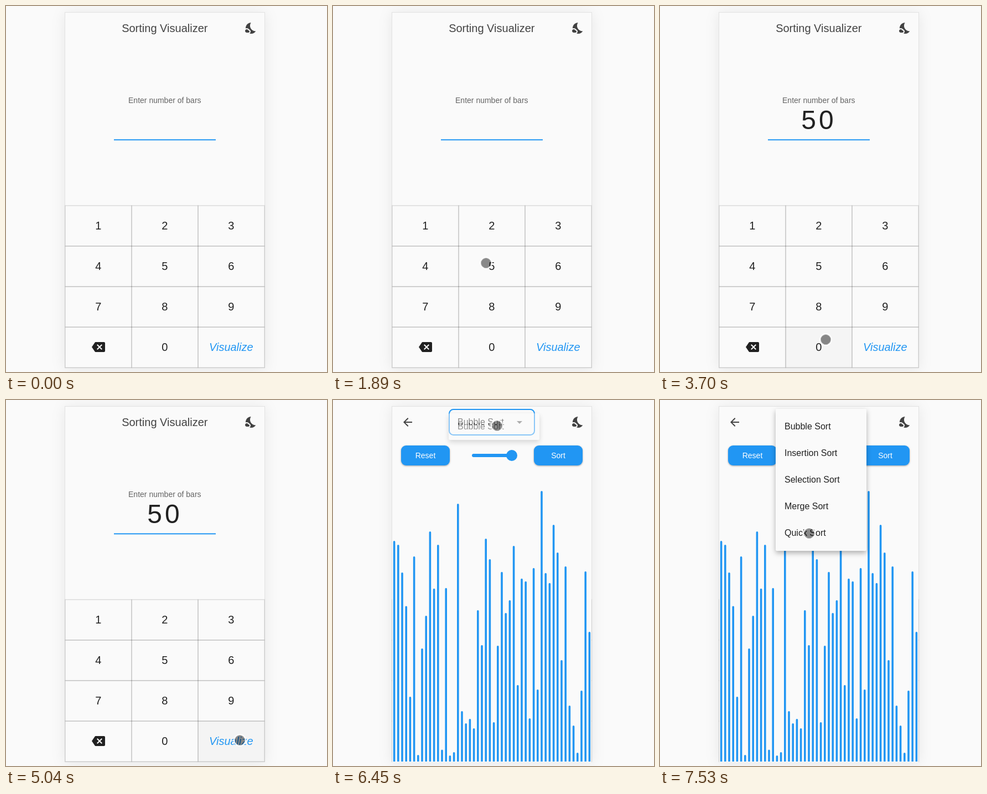
An HTML page that plays this animation: 580x660 px, repeating every 8000 ms.

```html
<!DOCTYPE html>
<html lang="en">
<head>
<meta charset="utf-8">
<title>Sorting Visualizer</title>
<style>
  html, body { margin: 0; width: 100%; height: 100%; overflow: hidden; background: #fafafa; }
  svg { display: block; }
  text { font: 16px "Liberation Sans", Arial, sans-serif; fill: #212121; white-space: pre; }
  .mid { text-anchor: middle; }
  .title { font-size: 20px; fill: #424242; }
  .label { font-size: 14px; fill: #646464; }
  .key { font-size: 20px; }
  .go { font-style: italic; fill: #2196f3; }
  .entry { font-size: 48px; letter-spacing: 5px; }
  .button rect { fill: #2196f3; filter: drop-shadow(0 1.5px 1.5px rgba(0, 0, 0, .35)); }
  .button text { font-size: 14px; fill: #fff; }
  .icon { fill: #424242; }
  .blue { fill: #2196f3; }
  .paper { fill: #fafafa; }
  .phone { fill: #fafafa; stroke: #e2e2e2; filter: drop-shadow(0 2px 12px rgba(0, 0, 0, .08)); }
  .cell { fill: none; stroke: rgba(0, 0, 0, .12); stroke-width: 1.5; }
  .sheet { filter: drop-shadow(0 4px 5px rgba(0, 0, 0, .3)); }

  /* One shared 8 s timeline */
  .timed, .cursor { animation: 8s linear infinite; }
  .one { animation-name: one; animation-timing-function: step-end; }
  .two { animation-name: two; animation-timing-function: step-end; }
  .pressZero { animation-name: pressZero; }
  .pressGo { animation-name: pressGo; }
  .results { animation-name: results; }
  .menu { animation-name: menu; }
  .sheet { animation-name: unfold; }
  .item { animation-name: item; animation-fill-mode: backwards; }
  .cursor { animation-name: cursorX, cursorY, cursorShow; }

  @keyframes one { 0%, 44.125% { opacity: 0 } 33.75% { opacity: 1 } 100% { opacity: 0 } }
  @keyframes two { 0% { opacity: 0 } 44.125%, 100% { opacity: 1 } }
  @keyframes pressZero { 0%, 43.8% { opacity: 0 } 46%, 49.1% { opacity: .02 } 51%, 100% { opacity: 0 } }
  @keyframes pressGo { 0%, 62.4% { opacity: 0 } 62.9%, 100% { opacity: .025 } }
  @keyframes results { 0%, 66% { opacity: 0 } 67.7%, 100% { opacity: 1 } }
  @keyframes menu { 0%, 80.19% { opacity: 0 } 81.125%, 100% { opacity: 1 } }
  @keyframes unfold {
    0%, 81.125% { y: 24px; height: 48px }
    82.0625%, 100% { y: 16px; height: 256px }
  }
  @keyframes item { 0%, 82.64% { opacity: 0 } 83.07%, 100% { opacity: 1 } }

  @keyframes cursorShow { 0%, 13.12% { opacity: 0 } 13.125%, 100% { opacity: 1 } }
  @keyframes cursorX {
    0%, 13% { transform: translateX(321.5px); animation-timing-function: ease-in-out }
    19.125%, 21% { transform: translateX(200.5px); animation-timing-function: ease-in-out }
    23.625%, 34% { transform: translateX(276.5px); animation-timing-function: ease-in-out }
    40.375%, 49% { transform: translateX(299.5px); animation-timing-function: ease-in-out }
    51.125%, 70.2% { transform: translateX(422.5px); animation-timing-function: ease-in-out }
    75% { transform: translateX(235px); animation-timing-function: ease-in-out }
    77.375%, 84% { transform: translateX(296.5px); animation-timing-function: ease-in-out }
    90.375%, 90.8% { transform: translateX(271px); animation-timing-function: ease-in-out }
    94.125%, 100% { transform: translateX(269.5px) }
  }
  @keyframes cursorY {
    0%, 13% { translate: 0 220px; animation-timing-function: ease-in-out }
    19.125%, 21% { translate: 0 480px; animation-timing-function: ease-in-out }
    23.625%, 34% { translate: 0 463.5px; animation-timing-function: ease-in-out }
    40.375%, 49% { translate: 0 601.5px; animation-timing-function: ease-in-out }
    51.125%, 70.2% { translate: 0 613.5px; animation-timing-function: ease-in-out }
    77.375%, 84% { translate: 0 46.5px; animation-timing-function: ease-in-out }
    90.375%, 90.8% { translate: 0 201px; animation-timing-function: ease-in-out }
    94.125%, 100% { translate: 0 240.5px }
  }
</style>
</head>
<body>
<svg width="580" height="660" viewBox="0 0 580 660">
  <rect class="phone" x="106.5" y="11.5" width="361" height="641"/>

  <g>
    <text class="title mid" x="286.8" y="47">Sorting Visualizer</text>
    <text class="label mid" x="286.8" y="175">Enter number of bars</text>
    <text class="entry timed one" x="271.2" y="222">5</text>
    <text class="entry timed two" x="255.3" y="222">50</text>
    <rect class="blue" x="195" y="240.3" width="184" height="2"/>
    <rect class="timed pressZero" x="227" y="579" width="120" height="73"/>
    <rect class="timed pressGo" x="347" y="579" width="120" height="73"/>
    <g id="keypad"></g>
    <path transform="translate(155 603)" fill="#212121" d="M22 3H7c-.69 0-1.23.35-1.59.88L0 12l5.41 8.11c.36.53.9.89 1.59.89h15c1.1 0 2-.9 2-2V5c0-1.1-.9-2-2-2zm-3 12.59L17.59 17 14 13.41 10.41 17 9 15.59 12.59 12 9 8.41 10.41 7 14 10.59 17.59 7 19 8.41 15.41 12 19 15.59z"/>
  </g>

  <g class="timed results">
    <rect class="paper" x="107" y="12" width="360" height="641"/>
    <path class="icon" transform="translate(123 28)" d="M20 11H7.83l5.59-5.59L12 4l-8 8 8 8 1.41-1.41L7.83 13H20z"/>
    <rect x="210" y="17" width="154" height="46" rx="7.5" fill="none" stroke="#2196f3" stroke-width="2"/>
    <text x="225" y="45">Bubble Sort</text>
    <path transform="translate(325 28)" fill="#666" d="M7 10l5 5 5-5z"/>
    <g class="button">
      <rect x="123" y="82" width="88" height="36" rx="9"/>
      <text class="mid" x="167" y="105">Reset</text>
    </g>
    <g class="button">
      <rect x="363" y="82" width="88" height="36" rx="9"/>
      <text class="mid" x="407" y="105">Sort</text>
    </g>
    <rect class="blue" x="251" y="97" width="75" height="6" rx="3"/>
    <circle class="blue" cx="323" cy="100" r="10"/>
    <path id="bars" class="blue"/>
  </g>

  <path class="icon" transform="translate(431 28)" d="M11.1 12.08c-2.33-4.51-.5-8.48.53-10.07C6.27 2.2 1.98 6.59 1.98 12c0 .14.02.28.02.42.62-.27 1.29-.42 2-.42 1.66 0 3.18.83 4.1 2.15 1.67.48 2.9 2.02 2.9 3.85 0 1.52-.87 2.83-2.12 3.51.98.32 2.03.5 3.11.5 3.5 0 6.58-1.8 8.37-4.52-2.36.23-6.98-.97-9.26-5.41zM7 16h-.18C6.4 14.84 5.3 14 4 14c-1.66 0-3 1.34-3 3s1.34 3 3 3h3c1.1 0 2-.9 2-2s-.9-2-2-2z"/>

  <g id="menu" class="timed menu">
    <rect class="sheet paper timed" x="209" y="16" width="164" height="256" rx="2"/>
  </g>

  <g class="cursor">
    <circle r="9.3" opacity=".45"/>
    <circle r="10.3" fill="none" stroke="#fff" stroke-width="2"/>
  </g>
</svg>
<script>
  const add = (parent, tag, attrs, label = "") => {
    const node = document.createElementNS("http://www.w3.org/2000/svg", tag);
    for (const name in attrs) node.setAttribute(name, attrs[name]);
    node.textContent = label;
    return parent.appendChild(node);
  };
  const byId = id => document.getElementById(id);

  const keys = ["1", "2", "3", "4", "5", "6", "7", "8", "9", "", "0", "Visualize"];
  keys.forEach((key, i) => {
    const x = 107 + i % 3 * 120, y = 360 + Math.floor(i / 3) * 73;
    add(byId("keypad"), "rect", { class: "cell", x, y, width: 120, height: 73 });
    const style = key.length > 1 ? "key mid go" : "key mid";
    add(byId("keypad"), "text", { class: style, x: x + 59.8, y: y + 43 }, key);
  });

  // Top edge of each bar; all stand on y = 652
  const tops = [
    254, 261, 311, 371.5, 535, 282, 640, 448, 389, 237,
    340, 261, 630.5, 339, 641, 635, 187, 561, 583, 575,
    592, 379, 442, 250, 287, 581, 443, 310, 384, 361,
    263, 514, 322, 327, 574, 303, 522, 164, 312, 330,
    225, 275, 469, 300, 551, 587, 636, 524, 309, 418
  ];
  byId("bars").setAttribute("d", tops.map((top, i) =>
    `M${(108.8 + i * 7.2).toFixed(1)} 652V${top + 1.8}a1.8 1.8 0 0 1 3.6 0V652z`).join(""));

  ["Bubble", "Insertion", "Selection", "Merge", "Quick"].forEach((name, i) =>
    add(byId("menu"), "text", {
      class: i ? "timed item" : "",
      style: `animation-delay: ${Math.max(0, i - 1) * 23}ms`,
      x: 225, y: 53 + i * 48
    }, name + " Sort"));
</script>
</body>
</html>
```
